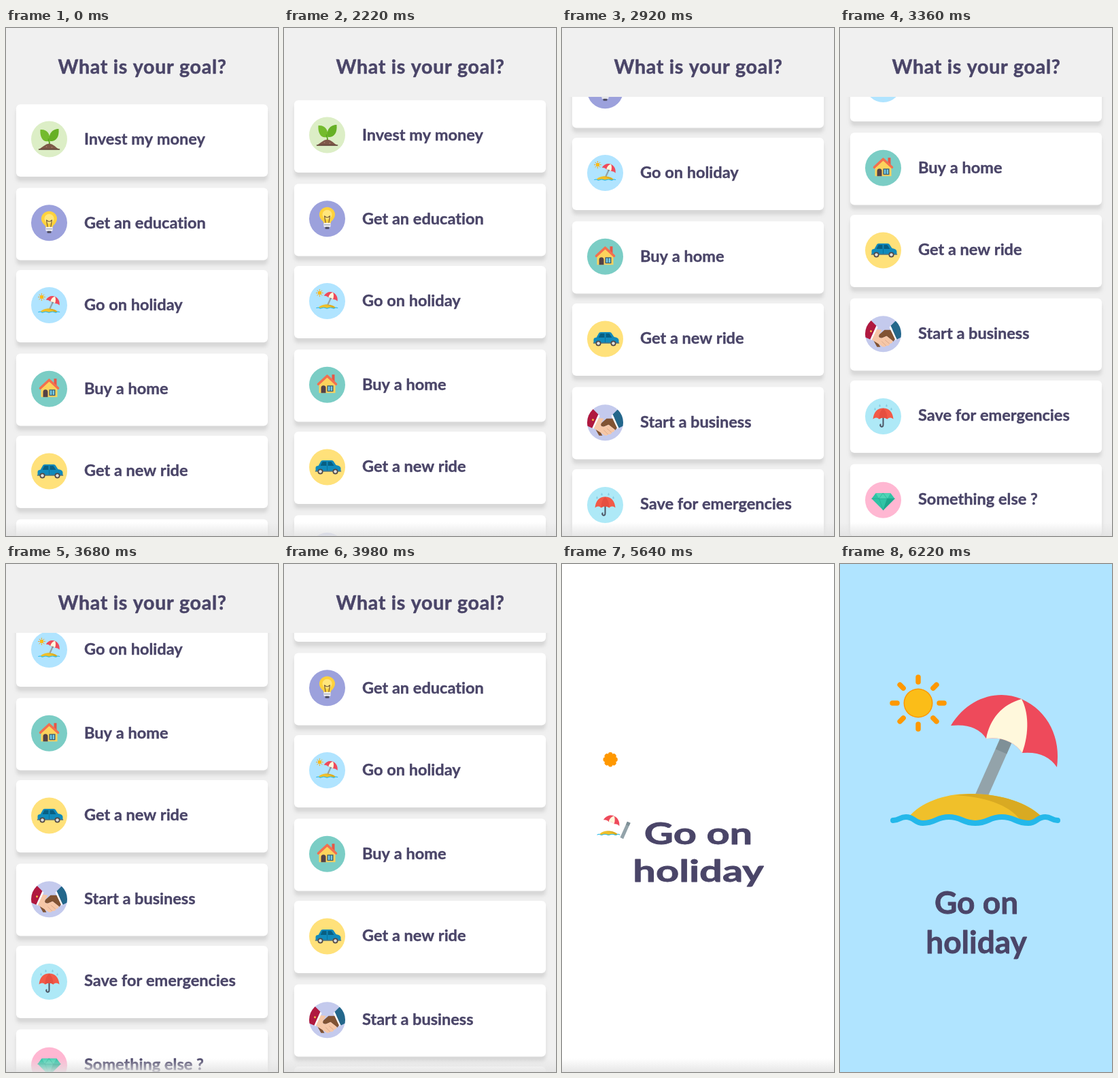
An HTML page with a canvas for the animation above (6240 ms loop, 400 by 745 pixels).

```html
<!DOCTYPE html>
<html lang="en">
<head>
<meta charset="utf-8">
<title>What is your goal?</title>
<style>
  html, body { margin: 0; width: 100%; height: 100%; overflow: hidden; background: #f0f0f0; }
  canvas { display: block; width: 400px; height: 745px; }
</style>
</head>
<body>
<canvas id="stage" width="400" height="745"></canvas>
<script>
const W = 400, H = 745, LOOP = 6240, OPEN = 5640, LIST_TOP = 101;
const INK = '#4a4568';
const ctx = document.getElementById('stage').getContext('2d');

const lerp = (a, b, p) => a + (b - a) * p;
const clamp01 = x => Math.min(1, Math.max(0, x));
const sineOut = x => Math.sin(x * Math.PI / 2);
const sineInOut = x => (1 - Math.cos(x * Math.PI)) / 2;
const quadOut = x => 1 - (1 - x) ** 2;

function fill(color, d) {
  ctx.fillStyle = color;
  ctx.fill(new Path2D(d));
}
function stroke(color, width, d, cap = 'round') {
  ctx.strokeStyle = color;
  ctx.lineWidth = width;
  ctx.lineCap = cap;
  ctx.lineJoin = 'round';
  ctx.stroke(new Path2D(d));
}
function disc(color, x, y, r) {
  ctx.fillStyle = color;
  ctx.beginPath();
  ctx.arc(x, y, r, 0, Math.PI * 2);
  ctx.fill();
}
function box(color, x, y, w, h, r = 0) {
  ctx.fillStyle = color;
  ctx.beginPath();
  ctx.roundRect(x, y, w, h, r);
  ctx.fill();
}
// A little tracking keeps ligatures off; the thin outline adds weight.
function text(str, x, y, size, align = 'left', spacing = .02) {
  ctx.font = `700 ${size}px Lato, "Open Sans", sans-serif`;
  ctx.letterSpacing = spacing + 'px';
  ctx.textAlign = align;
  ctx.fillStyle = ctx.strokeStyle = INK;
  ctx.lineWidth = size * .018;
  ctx.lineJoin = 'round';
  ctx.fillText(str, x, y);
  ctx.strokeText(str, x, y);
}
// Runs draw with its pivot (px, py) moved to (x, y) and scaled.
function place(x, y, scale, px, py, draw) {
  ctx.save();
  ctx.translate(x, y);
  ctx.scale(scale, scale);
  ctx.translate(-px, -py);
  draw();
  ctx.restore();
}

// Beach scene, in full-screen coordinates
const swell = [[122, 380], [160, 371], [199, 380], [238, 371], [277, 380]];
function ripple(points) {
  return points.slice(1).map(([x, y], i) => {
    const [x0, y0] = points[i], m = (x0 + x) / 2;
    return `C${m} ${y0} ${m} ${y} ${x} ${y}`;
  }).join('');
}
const wave = 'M78 376' + ripple([[78, 376], [97, 371], ...swell, [302, 371], [320, 376]]);
const dune = 'M101 371' + ripple([[101, 371], ...swell, [297, 371]]);

function sun(p) {
  const inner = lerp(5, 31, p), outer = lerp(8, 38, p);
  ctx.strokeStyle = '#ff9800';
  ctx.lineWidth = 7.5;
  ctx.lineCap = 'round';
  for (let i = 0; i < 8; i++) {
    const c = Math.cos(i * Math.PI / 4), s = Math.sin(i * Math.PI / 4);
    ctx.beginPath();
    ctx.moveTo(115 + c * inner, 204 + s * inner);
    ctx.lineTo(115 + c * outer, 204 + s * outer);
    ctx.stroke();
  }
  disc('#ff9800', 115, 204, lerp(9, 21.5, p));
  disc('#fbbd18', 115, 204, 20 * p);
}
function pole() {
  stroke('#93a3aa', 18, 'M244 259L207 342', 'butt');
  stroke('#7f9097', 18, 'M244 259L237 275', 'butt');
}
function canopy() {
  fill('#ee4a5b', 'M163 237C188 196 232 183 267 198C307 216 325 256 319 298Q303 274 268 277Q250 252 215 256Q200 233 163 237Z');
  fill('#fff8dc', 'M267 198C238 206 220 228 215 256Q250 252 268 277C279 247 277 216 267 198Z');
}
function island() {
  fill('#f0c02a', dune + 'C272 346 228 337 190 337C152 337 119 350 101 371Z');
  fill('#d9aa22', 'M170 339C222 342 254 358 266 377Q283 381 297 371C272 346 220 332 170 339Z');
  stroke('#24b8ea', 8, wave);
}

// Icons, centred on 0,0
function sprout() {
  fill('#74bb2d', 'M-1 3C-9 5 -14 -3 -13 -14C-4 -15 3 -8 0 3Z');
  fill('#66b025', 'M1 3C-2 -8 5 -15 14 -15C15 -3 10 4 1 3Z');
  stroke('#5da822', 2, 'M-1 0Q1 5 .5 10');
  fill('#7d5848', 'M-15 15Q-11 12 -8 10Q0 3 8 10Q11 13 15 15Z');
  stroke('#5d4037', 1.6, 'M-15 15H15');
  disc('#a1796a', -4, 11, .9);
  disc('#a1796a', 4, 12, .9);
}
function bulb() {
  fill('#ffd23c', 'M-5 7Q-5 4 -8 2C-16 -7 -9 -17 0 -17S16 -7 8 2Q5 4 5 7Z');
  disc('#ffe67c', 0, -6, 7);
  stroke('#755b38', 1.2, 'M-2 8L-4 -4L-1 -2L1 -2L4 -4L2 8');
  box('#f2f2f2', -5, 6, 10, 6, 1);
  stroke('#8b91a5', 1, 'M-4 9H4');
  box('#4c4b5e', -3, 12, 6, 3, 1);
}
function beach() {
  place(0, 0, .128, 201, 297, () => { sun(1); pole(); canopy(); island(); });
}
function house() {
  box('#e85646', 7, -15, 4, 11);
  fill('#fcd35c', 'M0 -13L12 -2V12H-12V-2Z');
  stroke('#f2704f', 3.6, 'M-13 -1L0 -13L13 -1');
  box('#534247', -9, 1, 7, 11, [3.5, 3.5, 0, 0]);
  box('#365a70', 0, 1, 9, 9);
  box('#74cbe7', 1.4, 2.2, 2.5, 6.6);
  box('#74cbe7', 5.1, 2.2, 2.5, 6.6);
}
function car() {
  fill('#118abb', 'M-17 6V1Q-17 -2 -13 -2L-9 -9Q-8 -10 -6 -10H6Q8 -10 9 -9L13 -3Q20 -2 20 2V6Z');
  fill('#075f83', 'M-10 -2L-7 -8H-1V-2ZM1 -2V-8H6L10 -2Z');
  stroke('#086b94', .8, 'M0 -2V5');
  stroke('#52717e', 1.6, 'M-17 6H20');
  for (const x of [-10, 12]) {
    disc('#514846', x, 6.5, 4);
    disc('#dfe0dd', x, 6.5, 2.3);
  }
}
function handshake() {
  ctx.beginPath();
  ctx.arc(0, 0, 26.5, 0, Math.PI * 2);
  ctx.clip();
  fill('#815333', 'M14 -6L2 -6L-6 1Q-8 6 -2 6L5 3L15 11L20 4ZM-14 10L-7 14L-4 19H-9Z');
  fill('#f6c7a7', 'M-10 -7L-2 -6L-6 1Q-8 6 -2 6L5 3L14 10Q14 14 10 14Q9 18 5 17Q1 21 -3 17L-17 8Z');
  stroke('#d9a98b', .9, 'M3 9L9 14M-2 11L4 17');
  fill('#b0183f', 'M-28 -14L-18 -20L-10 -12L-19 8L-28 4Z');
  fill('#fff', 'M-10 -12L-8 -10L-17 9L-19 8Z');
  fill('#23678b', 'M28 -14L18 -19L11 -12L20 8L28 4Z');
  fill('#fff', 'M11 -12L9 -10L18 9L20 8Z');
  disc('#f6c344', -18, -4, 1.4);
}
function umbrella() {
  stroke('#4c5564', 2, 'M0 -10V12Q0 16 -3 15Q-5 14 -4 12');
  fill('#f25a48', 'M-15 4Q-13 -12 0 -12T15 4Q10 0 6 4Q0 0 -6 4Q-10 0 -15 4Z');
  fill('#e64f40', 'M0 -12Q6 -7 6 4Q0 0 -6 4Q-6 -7 0 -12Z');
  for (const [x, y] of [[-12, -11], [-5, -16], [5, -16], [12, -11]]) {
    fill('#86cde2', `M${x} ${y - 2}q2.5 4 0 4q-2.5 0 0 -4Z`);
  }
}
function gem() {
  fill('#2fc3a5', 'M-11 -10H11L17 -2L0 15L-17 -2Z');
  fill('#4fd4b6', 'M-11 -10H11L6 -2H-6Z');
  fill('#1da88d', 'M6 -2H17L0 15Z');
  stroke('#1a9e86', .5, 'M-17 -2H17M-6 -2L0 15L6 -2L0 -10Z');
}

const goals = [
  ['Invest my money', '#dceec6', sprout],
  ['Get an education', '#9ca1dc', bulb],
  ['Go on holiday', '#b0e4ff', beach],
  ['Buy a home', '#7bcdc5', house],
  ['Get a new ride', '#ffe17a', car],
  ['Start a business', '#c4caed', handshake],
  ['Save for emergencies', '#aee9f7', umbrella],
  ['Something else ?', '#ffb7d2', gem]
];
const CARD_PITCH = 121.5, ICON_PITCH = 121.75;

// Two swipes down, one back up: [start, end, from, to, easing]
const swipes = [
  [2208, 2780, 0, 160, sineOut],
  [2840, 3480, 160, 331, sineOut],
  [3480, 4250, 331, 19, sineInOut]
];
function scrollAt(t) {
  let y = 0;
  for (const [start, end, from, to, ease] of swipes) {
    if (t >= start) y = lerp(from, to, ease(clamp01((t - start) / (end - start))));
  }
  return Math.round(y);
}

function card([label, color, icon], y, iconY) {
  ctx.save();
  ctx.shadowColor = 'rgba(0,0,0,.1)';
  ctx.shadowBlur = 5;
  ctx.shadowOffsetY = 7;
  box('#fff', 15, y - 51, 370, 106, 6);
  ctx.restore();
  disc(color, 63.5, iconY, 26.5);
  place(63.5, iconY, 1, 0, 0, icon);
  text(label, 115, y + 8, 23.5);
}

function bottomFade(alpha) {
  const g = ctx.createLinearGradient(0, 725, 0, H);
  g.addColorStop(0, 'rgba(226,226,226,0)');
  g.addColorStop(1, `rgba(226,226,226,${.85 * alpha})`);
  ctx.fillStyle = g;
  ctx.fillRect(0, 725, W, 20);
}

function drawList(t) {
  box('#f0f0f0', 0, 0, W, H);
  text('What is your goal?', 200.5, 67, 28.5, 'center', .75);
  const scroll = scrollAt(t);
  ctx.save();
  ctx.beginPath();
  ctx.rect(0, LIST_TOP, W, H - LIST_TOP);
  ctx.clip();
  goals.forEach((goal, i) => {
    const top = 163 + i % 2 - scroll;
    card(goal, top + i * CARD_PITCH, top + i * ICON_PITCH);
  });
  ctx.restore();
  bottomFade(1);
}

function drawGoal(t) {
  const p = quadOut(clamp01((t - OPEN) / 580));
  const part = (x, y, scale, endX, endY, draw) =>
    place(lerp(x, endX, p), lerp(y, endY, p), lerp(scale, 1, p), endX, endY, draw);

  box(`rgb(${lerp(255, 176, p)},${lerp(255, 228, p)},255)`, 0, 0, W, H);
  part(71, 287, .9, 115, 204, () => sun(p));
  part(93, 390, .28, 227, 298, pole);
  part(72, 377, .147, 241, 245, canopy);
  part(68, 395, .133, 199, 361, island);

  ctx.save();
  ctx.translate(200.5, lerp(411, 513, p));
  ctx.scale(lerp(1.295, 1, p), lerp(.95, 1, p));
  text('Go on', 0, 0, 46, 'center');
  text('holiday', 0, 57.5, 46, 'center');
  ctx.restore();
  bottomFade(1 - p);
}

const origin = performance.now();
function frame() {
  const t = (performance.now() - origin) % LOOP;
  (t < OPEN ? drawList : drawGoal)(t);
  requestAnimationFrame(frame);
}
frame();
</script>
</body>
</html>
```
